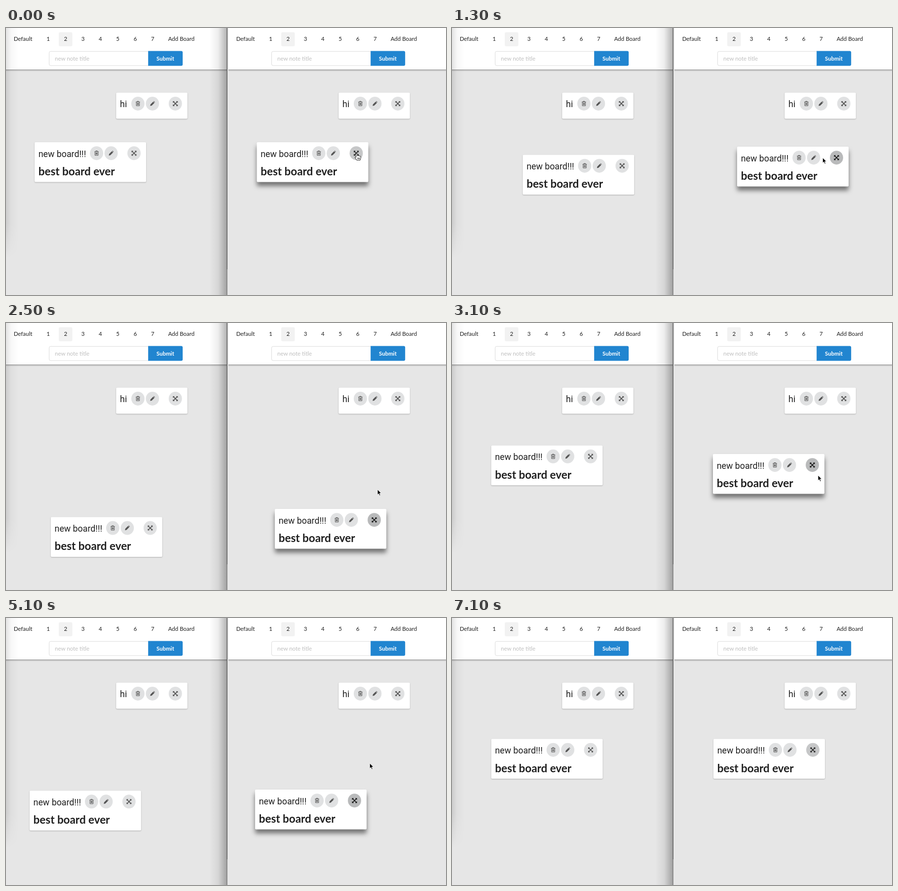
Recreate the animation shown at these times as an HTML page. Size 892x540 px, loop 7.2 s.

```html
<!DOCTYPE html>
<html lang="en">
<head>
<meta charset="utf-8">
<title>Shared board</title>
<style>
  html, body { margin: 0; width: 100%; height: 100%; overflow: hidden; background: #e6e6e6; }
  svg { display: block; }
  text { font: 11.5px Lato, sans-serif; fill: #1f1f1f; }
  .mid { text-anchor: middle; }
  .submit { font-weight: 700; fill: #fff; }
  .hint { fill: #bfbfbf; }
  .title { font: 17.8px Roboto, sans-serif; }
  .body { font-weight: 700; font-size: 22.4px; }
  .paper { fill: #fff; filter: drop-shadow(0 1px 1px rgba(0, 0, 0, .25)); }
  .button { fill: #e0e1e2; color: #555; }
  .button.hover { fill: #c6c7c8; color: #222; }
  .button.active { fill: #b9babb; color: #111; }
  .solid { fill: currentColor; }
  .line { fill: none; stroke: currentColor; }
</style>
</head>
<body>
<svg width="892" height="540" viewBox="0 0 892 540">
  <defs>
    <linearGradient id="edgeLeft">
      <stop offset="0" stop-opacity=".11"/>
      <stop offset=".4" stop-opacity=".03"/>
      <stop offset="1" stop-opacity="0"/>
    </linearGradient>
    <linearGradient id="edgeRight">
      <stop offset="0" stop-opacity="0"/>
      <stop offset=".5" stop-opacity=".07"/>
      <stop offset="1" stop-opacity=".3"/>
    </linearGradient>
    <linearGradient id="fade" x2="0" y2="1">
      <stop offset=".85" stop-color="#fff"/>
      <stop offset="1" stop-color="#000"/>
    </linearGradient>
    <mask id="fadeOut"><rect width="30" height="465" fill="url(#fade)"/></mask>
    <g id="trash">
      <path class="line" d="M-4.3-3.2H4.3M-1.6-3.3V-4.7H1.6V-3.3M-3.2-3V4.4H3.2V-3M-1.3-1.4V2.8M0-1.4V2.8M1.3-1.4V2.8"/>
    </g>
    <g id="pencil">
      <path class="solid" d="M-4.7 4.7-4 1.5 1.5-4 4-1.5-1.5 4ZM2.1-4.6 3-5.2 5.2-3 4.6-2.1Z"/>
    </g>
    <g id="move">
      <path class="line" stroke-width="1.6" d="M-3.5-3.5 3.5 3.5M3.5-3.5-3.5 3.5"/>
      <path class="solid" d="M-5-5H-1.3L-5-1.3ZM5-5V-1.3L1.3-5ZM5 5H1.3L5 1.3ZM-5 5V1.3L-1.3 5Z"/>
    </g>
  </defs>
  <g id="pages"></g>
  <rect width="26" height="465" fill="url(#edgeLeft)" mask="url(#fadeOut)"/>
  <rect x="412" width="36" height="540" fill="url(#edgeRight)"/>
  <path d="M448.2 0V488" stroke="#5a5a5a" stroke-width="1.4"/>
  <path d="M448 488V540" stroke="#777" stroke-width="1.4"/>
  <path id="arrow" stroke="#fff" stroke-width=".9" d="M0 0V10.8L2.5 8.5 4.3 12.6 6.1 11.8 4.4 7.8H7.8Z"/>
  <g id="hand" fill="#fff" stroke="#111" stroke-width=".9" stroke-linejoin="round">
    <path d="M-1.2 8V1.2Q-1 0 0 0T1.2 1.2V5Q3 4 3.6 5.2Q5 4.4 5.8 5.8Q8 5.2 8.2 7.2V10L7 14H0L-3.6 8.6Q-3.6 6.6-1.2 8Z"/>
    <path fill="none" d="M2 9V12M3.8 9V12M5.6 9V12"/>
  </g>
</svg>
<script>
const LOOP = 7200, STEP = 100, PAGE_GAP = 450.5;
const $ = id => document.getElementById(id);

const text = (x, y, cls, s) => `<text x="${x}" y="${y}" class="${cls}">${s}</text>`;

function button(icon, x) {
  return `<g class="button ${icon}" transform="translate(${x} 22.2)">
    <ellipse rx="13.4" ry="14"/><use href="#${icon}"/></g>`;
}

function card(id, x, y, w, h, title, body = '') {
  return `<g id="${id}" transform="translate(${x} ${y})">
    <rect class="paper" width="${w}" height="${h}" rx="2"/>
    ${text(7.8, 29.5, 'title', title)}${text(7.8, 67, 'body', body)}
    ${button('trash', w - 100.4)}${button('pencil', w - 70.9)}${button('move', w - 24.5)}</g>`;
}

function page(x, side) {
  const boards = [1, 2, 3, 4, 5, 6, 7].map(n => text(50.2 + n * 35.3, 26.4, 'mid', n)).join('');
  return `<g transform="translate(${x} 0)">
    <rect y="84" width="448" height="4" fill="#000" opacity=".05"/>
    <rect y="83.5" width="448" height="2" fill="#999"/>
    <rect width="448" height="84" fill="#fff"/>
    <rect x="107" y="8.5" width="27.5" height="28.5" rx="3" fill="#f2f2f2"/>
    ${text(34.5, 26.4, 'mid', 'Default')}${boards}${text(355.4, 26.4, 'mid', 'Add Board')}
    <rect x="87.5" y="47.3" width="204" height="28.7" rx="3" fill="#fff" stroke="#dcdcdc"/>
    <path d="M288.2 46.6H355.2q3 0 3 3V73.4q0 3-3 3H288.2Z" fill="#2185d0"/>
    ${text(99, 65.6, 'hint', 'new note title')}${text(323, 65.6, 'mid submit', 'Submit')}
    </g>
    ${card(side + 'Small', 223.3 + x, 130.7, 144.5, 52.8, 'hi')}
    ${card(side, 0, 0, 226, 80.6, 'new board!!!', 'best board ever')}`;
}

$('pages').innerHTML = page(0, 'left') + page(451, 'right');

// Drag of the right card: position, and velocity in pixels per step
const drag = [
  { t: 100, at: [508.5, 231], v: [0, 0] },
  { t: 700, at: [545, 331], v: [12, 0] },
  { t: 1300, at: [578, 240], v: [-24, -14] },
  { t: 2500, at: [545, 376], v: [3, -24] },
  { t: 3100, at: [529, 265], v: [1, 32] },
  { t: 3300, at: [532, 283], v: [4, 0] },
  { t: 4200, at: [584, 231], v: [42, 0] },
  { t: 4400, at: [610, 240], v: [0, 0] },
  { t: 5100, at: [505, 347], v: [17, -11] },
  { t: 5400, at: [530, 244.5], v: [0, 0] }
];

const clamp = (v, lo, hi) => Math.max(lo, Math.min(hi, v));

// Cubic Hermite curve through the drag points
function position(time) {
  const t = clamp(time, drag[0].t, drag.at(-1).t);
  const next = drag.findIndex((p, i) => i && p.t >= t);
  const a = drag[next - 1], b = drag[next];
  const steps = (b.t - a.t) / STEP, u = (t - a.t) / (b.t - a.t);
  const ease = u * u * (3 - 2 * u), leave = steps * u * (1 - u) ** 2, arrive = steps * u * u * (u - 1);
  return [0, 1].map(k => a.at[k] + (b.at[k] - a.at[k]) * ease + a.v[k] * leave + b.v[k] * arrive);
}

const place = (id, x, y) => $(id).setAttribute('transform', `translate(${x} ${y})`);
const show = (id, on) => $(id).style.display = on ? '' : 'none';

const paper = document.querySelector('#right .paper');
const grip = document.querySelector('#right .move');

function draw(t) {
  const [x, y] = position(t);
  const [lagX, lagY] = position(t - 100);   // the other window follows late
  const [leadX, leadY] = position(t + 200); // the pointer runs ahead
  place('right', x, y);
  place('left', lagX - PAGE_GAP, lagY);
  place('arrow', leadX + 210, leadY + 25);
  place('hand', x + 202.5, y + 22.3);

  const resting = t < 200 || t >= 5600;
  show('hand', resting && t < 6500);
  show('arrow', !resting);
  grip.setAttribute('class', 'button move ' + (t < 100 || t >= 5700 ? 'hover' : 'active'));

  // The shadow dips during the quick pull at 4200 and fades after release
  const lift = clamp(Math.min(.1 + Math.abs(t - 4200) / 250, 1 - (t - 5700) / 300), 0, 1);
  paper.style.filter =
    `drop-shadow(0 ${1 + 7 * lift}px ${1 + 4 * lift}px rgba(0,0,0,${.25 + .25 * lift}))`;
}

const start = performance.now();
function tick() {
  const t = (performance.now() - start) % LOOP;
  draw(Math.floor(t / STEP) * STEP);
  requestAnimationFrame(tick);
}
tick();
</script>
</body>
</html>
```
